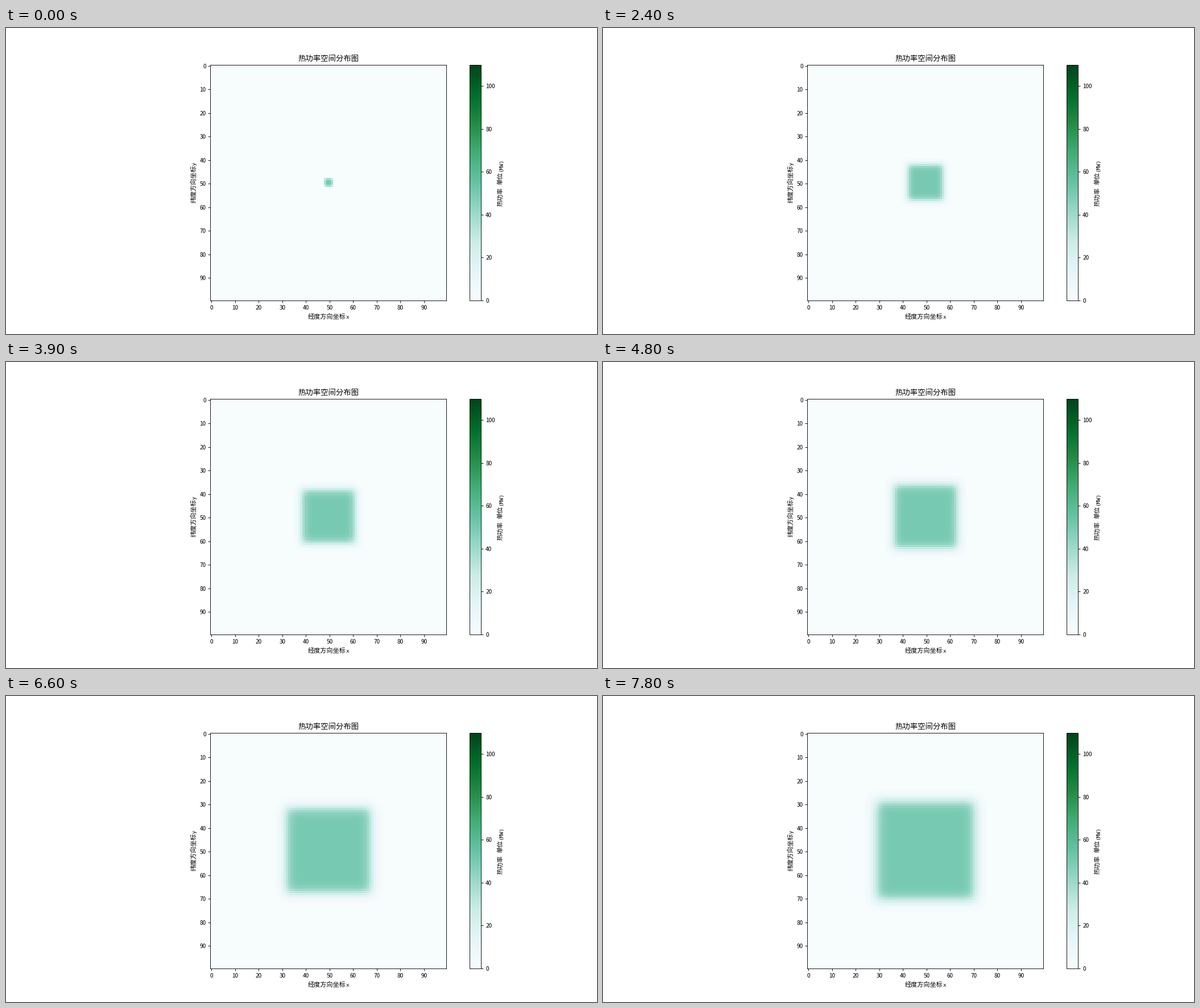
Animation of 1039x539 px, one loop 8 s. Source, as a matplotlib script:

```python
from itertools import groupby

import numpy as np
import matplotlib.pyplot as plt
from matplotlib.animation import FuncAnimation

W, H, DPI = 1039, 539, 80
HALF = 50          # cells from the centre to each side
SPREAD = 0.75      # share of a cell the front advances per step
PEAK = 50          # MW in a fully heated cell
STEPS, HOLD = 27, 3
EM = 10 * DPI / 72

plt.rcParams["font.family"] = "Noto Sans CJK JP"
plt.rcParams["font.size"] = 10


def build_profiles():
    """Outward 1-D profile of the heated square after each step."""
    front = np.zeros(HALF)
    front[0] = 1
    out = []
    for _ in range(STEPS):
        front[1:] = SPREAD * front[:-1] + (1 - SPREAD) * front[1:]
        out.append(np.concatenate([front[::-1], front]))
    return out


def label(fig, x, y, text, upright=False):
    """Text from pixel (x, y); Latin letters take half an em each."""
    for latin, run in groupby(text, str.isascii):
        run = "".join(run)
        fig.text(x / W, 1 - y / H, run, rotation=90 if upright else 0,
                 rotation_mode="anchor", ha="left", va="baseline",
                 family="DejaVu Sans Mono" if latin else "Noto Sans CJK JP",
                 size=10 * 0.5 / 0.6 if latin else 10)
        step = len(run) * EM * (0.5 if latin else 1)
        if upright:
            y -= step
        else:
            x += step


profiles = build_profiles()


def heat(step):
    return PEAK * np.outer(profiles[step], profiles[step])


fig, ax = plt.subplots(figsize=(W / DPI, H / DPI), dpi=DPI)
fig.subplots_adjust(left=0.1253, right=0.9003)
image = ax.imshow(heat(0), cmap="BuGn", vmin=0, vmax=110,
                  interpolation="nearest")
bar = fig.colorbar(image, ax=ax)

ticks = range(0, 100, 10)
ax.set_xticks(ticks)
ax.set_yticks(ticks)
ax.tick_params(labelsize=9)
ax.tick_params(axis="x", pad=4)
bar.ax.tick_params(labelsize=9)

ax.set_title("热功率空间分布图", fontsize=12)
label(fig, 530.5, 512.2, "经度方向坐标x")
label(fig, 333.2, 308.3, "纬度方向坐标y", upright=True)
label(fig, 872.7, 314.4, "热功率 单位(MW)", upright=True)


def draw(i):
    image.set_data(heat(min(i // HOLD, STEPS - 1)))
    return [image]


anim = FuncAnimation(fig, draw, frames=80, interval=100, repeat=True,
                     repeat_delay=0, blit=False)
plt.show()
```
